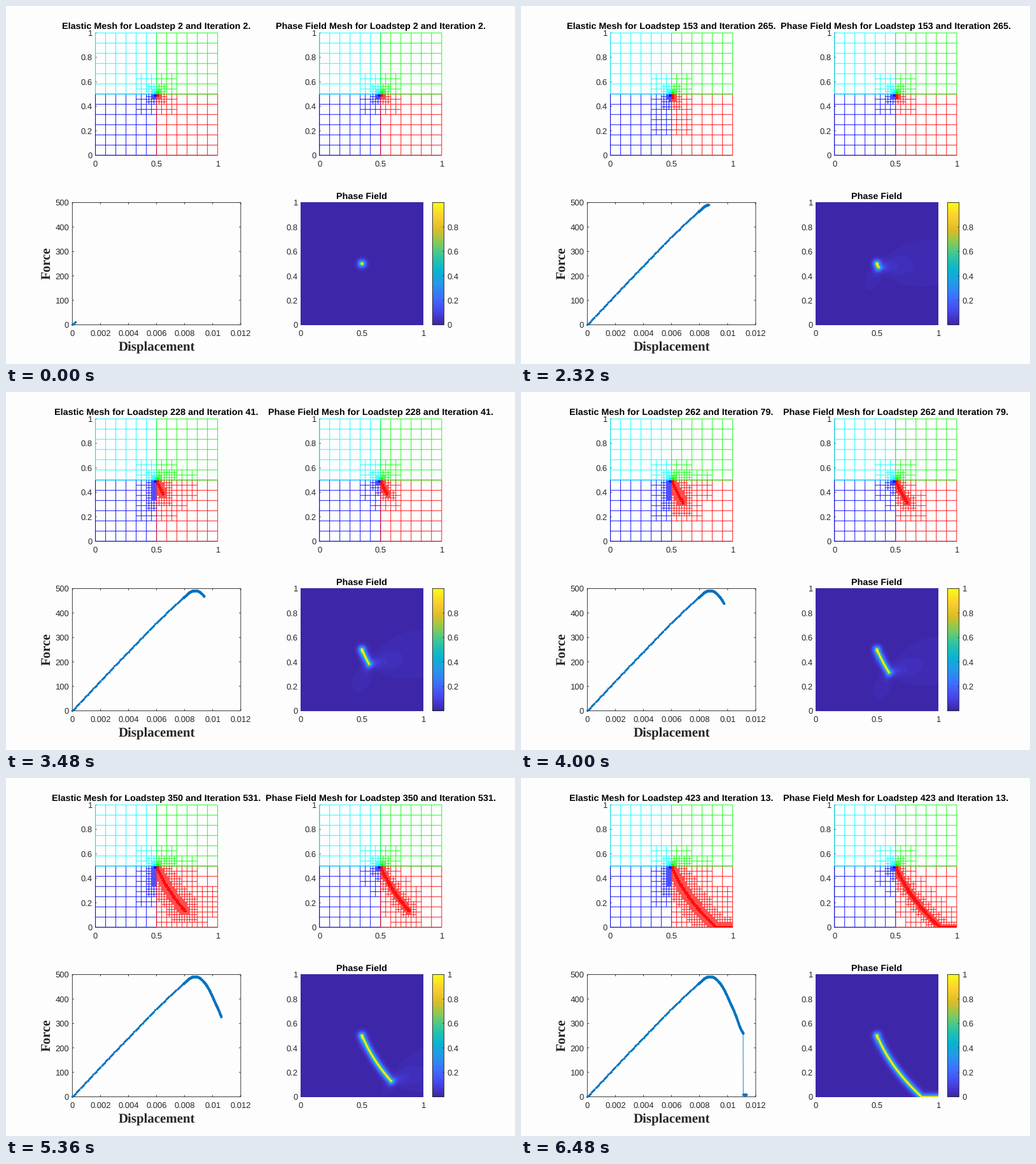
Animation of 800x562 px, one loop 6520 ms. Source, as a matplotlib script:

```python
import numpy as np
import matplotlib.pyplot as plt
from matplotlib.animation import FuncAnimation
from matplotlib.collections import LineCollection
from matplotlib.colors import LinearSegmentedColormap

plt.rcParams["text.hinting"] = "none"

W, H, DPI = 800, 562, 100
FRAMES, INTERVAL = 163, 40
PT = 72 / DPI                       # points per pixel
PAPER, INK, LINE = "#fdfdfe", "#262626", "#0072bd"
TICK, TITLE, LABEL = 13.04 * PT, 14.35 * PT, 20.86 * PT
LAST, BREAK = 423, 400              # final load step, step of full rupture

PARULA = LinearSegmentedColormap.from_list("parula", [
    (.2422, .1504, .6603), (.2803, .2782, .9221), (.2440, .4358, .9988),
    (.1540, .5902, .9218), (.0297, .7082, .8163), (.1938, .7758, .6251),
    (.5044, .7993, .3480), (.8634, .7406, .1596), (.9892, .8136, .1885),
    (.9769, .9839, .0805)], N=64)

fig = plt.figure(figsize=(W / DPI, H / DPI), dpi=DPI, facecolor=PAPER)
ax = fig.add_axes([0, 0, 1, 1])
ax.axis("off")


# ---- crack path: curve down to the lower edge, then along it ----
cy = np.linspace(.5, 0, 250)
fit = np.polyfit([.5, .385, .24, .13, 0], [.5, .555, .648, .737, .865], 3)
px = np.r_[np.polyval(fit, cy), np.linspace(.865, 1, 50)]
py = np.r_[cy, np.zeros(50)]
px[0] = .5
reach = np.interp(-py, [-.5, -.47, -.385, -.24, -.13, -.035],
                  [93, 153, 228, 298, 350, BREAK - 1])
reach[0] = 0
reach[py < .035] = BREAK


# ---- helpers ----
def text(x, y, s, size=TICK, ha="center", **kw):
    kw = {"family": "Liberation Sans", "color": INK, **kw}
    return ax.text(x, y, s, fontsize=size, ha=ha, va="baseline", **kw)


def bold(x, y, s=""):
    return text(x, y, s, TITLE, weight="bold", color="black")


def stroke(x, y, z=1):
    ax.plot(x, y, color=INK, lw=.9 * PT, zorder=z, solid_capstyle="butt", snap=False)


def x_labels(left, width, base, labels):
    for i, s in enumerate(labels):
        text(left + width * i / (len(labels) - 1), base, s)


def y_labels(right, bottom, height, labels):
    for i, s in enumerate(labels):
        text(right, bottom - height * i / (len(labels) - 1) + 4.7, s, ha="right")


UNIT = ["0", "0.2", "0.4", "0.6", "0.8", "1"]
HALF = ["0", "0.5", "1"]


# ---- quadtree meshes ----
BASE = 1 / 12
QUADS = [((0, 0), "#0000ff"), ((.5, 0), "#ff0000"),
         ((0, .5), "#00ffff"), ((.5, .5), "#00ff00")]


def quad_color(x, y):
    return next(c for (qx, qy), c in QUADS if qx <= x < qx + .5 and qy <= y < qy + .5)


def base_grid():
    segs, cols = [], []
    for (qx, qy), c in QUADS:
        for k in range(7):
            t = k * BASE
            segs += [[(qx + t, qy), (qx + t, qy + .5)], [(qx, qy + t), (qx + .5, qy + t)]]
            cols += [c, c]
    return segs, cols


def refine(reaches, zones=()):
    """Crosses of every split cell, as (birth, segments, colour)."""
    out = []

    def split(x, y, h, level, parent):
        radius = np.full(px.size, reaches[level] * h)
        radius[0] = 1.05 * h        # notch tip
        near = np.maximum(abs(px - x), abs(py - y)) - h / 2 < radius
        t = reach[near.argmax()] if near.any() else np.inf
        for deep, x0, y0, x1, y1, start in zones:
            if level <= deep and x0 < x < x1 and y0 < y < y1:
                t = min(t, start)
        t = max(t, parent)
        if t == np.inf:
            return
        r = h / 2
        out.append((t, [[(x - r, y), (x + r, y)], [(x, y - r), (x, y + r)]], quad_color(x, y)))
        if level + 1 < len(reaches):
            for dx in (-r / 2, r / 2):
                for dy in (-r / 2, r / 2):
                    split(x + dx, y + dy, r, level + 1, t)

    for i in range(12):
        for j in range(12):
            split((i + .5) * BASE, (j + .5) * BASE, BASE, 0, 0)
    return sorted(out, key=lambda c: c[0])


class Mesh:
    SIZE, BOTTOM = 192.1, 234.3

    def __init__(self, left, name, reaches, zones=()):
        self.name = name
        top = self.BOTTOM - self.SIZE
        stroke([left, left, left + self.SIZE], [top, self.BOTTOM, self.BOTTOM])
        for k in range(6):
            y = self.BOTTOM - self.SIZE * k / 5
            stroke([left, left + 2], [y, y])
        x_labels(left, self.SIZE, 252, HALF)
        y_labels(left - 5, self.BOTTOM, self.SIZE, UNIT)
        self.title = bold(left + self.SIZE / 2, 36.3)

        segs, cols = base_grid()
        self.fixed = len(segs)
        cells = refine(reaches, zones)
        self.births = np.array([c[0] for c in cells])
        for _, cross, c in cells:
            segs += cross
            cols += [c, c]
        self.segs = np.array(segs) * [self.SIZE, -self.SIZE] + [left, self.BOTTOM]
        self.lines = LineCollection([], colors=cols, linewidths=.88 * PT, zorder=2, snap=False)
        ax.add_collection(self.lines)

    def update(self, step, iteration):
        n = np.searchsorted(self.births, step, "right")
        self.lines.set_segments(self.segs[:self.fixed + 2 * n])
        self.title.set_text(f"{self.name} for Loadstep {step} and Iteration {iteration}.")


# deepest level, box, first load step
ZONES = [(0, 1 / 3, 1 / 6, 2 / 3, 1 / 3, 148), (0, 2 / 3, 1 / 3, 5 / 6, 7 / 12, 215),
         (0, 5 / 6, 1 / 12, 1, 1 / 3, 330), (2, 11 / 24, 1 / 3, .5, .5, 200),
         (1, 5 / 12, 1 / 4, .5, .5, 215), (1, .5, .5, 2 / 3, 7 / 12, 215)]
meshes = [Mesh(140.6, "Elastic Mesh", (1.4, 1.6, 1.1, .4), ZONES),
          Mesh(492.7, "Phase Field Mesh", (.9, .7, .6, .5))]


# ---- force against displacement ----
FL, FR, FT, FB = 104.3, 368.9, 308.6, 500.4


def hermite(x, xs, ys):
    m = np.gradient(ys, xs)
    i = np.clip(np.searchsorted(xs, x, "right") - 1, 0, len(xs) - 2)
    h = xs[i + 1] - xs[i]
    t = (x - xs[i]) / h
    return ((1 + 2 * t) * (1 - t) ** 2 * ys[i] + t * (1 - t) ** 2 * h * m[i]
            + t * t * (3 - 2 * t) * ys[i + 1] + t * t * (t - 1) * h * m[i + 1])


steps = np.arange(LAST + 1)
disp = .1 * np.minimum(steps, 79) + .01 * np.maximum(steps - 79, 0)     # in 1e-3
force = hermite(
    disp,
    np.array([0, 2, 4, 6, 7, 8, 8.35, 8.7, 9.05, 9.4, 9.75, 10.1, 10.62, 10.9, 11.11]),
    np.array([0, 122, 242, 360, 415, 467, 485, 492, 487, 468, 437, 394, 325, 280, 259.]))
force[BREAK:] = 8
curve_x = FL + disp / 12 * (FR - FL)
curve_y = FB - force / 500 * (FB - FT)

stroke([FL, FR, FR, FL, FL], [FB, FB, FT, FT, FB])
for k in range(7):
    x = FL + (FR - FL) * k / 6
    stroke([x, x], [FB, FB - 2.7])
    stroke([x, x], [FT, FT + 2.7])
for k in range(6):
    y = FB - (FB - FT) * k / 5
    stroke([FL, FL + 2.7], [y, y])
    stroke([FR, FR - 2.7], [y, y])
x_labels(FL, FR - FL, 518, ["0"] + [f"{.002 * k:.3g}" for k in range(1, 7)])
y_labels(99, FB, FB - FT, [str(100 * k) for k in range(6)])
serif = dict(family="Liberation Serif", weight="bold")
text(237, 542, "Displacement", LABEL, **serif)
text(69.5, 404, "Force", LABEL, rotation=90, rotation_mode="anchor", **serif)
curve, = ax.plot([], [], color=LINE, lw=.9 * PT, marker="o", ms=3.5 * PT, mew=0,
                 zorder=3, snap=False)


# ---- phase field ----
PL, PR, PTOP, PBOT = 463.2, 655.6, 308.5, 500.8
N = 192
g = (np.arange(N) + .5) / N
gx, gy = np.meshgrid(g, g[::-1])
near = np.full((N, N), np.inf)
nearest = np.zeros((N, N), int)
for k, (x, y) in enumerate(zip(px, py)):
    d = np.hypot(gx - x, gy - y)
    closer = d < near
    near[closer] = d[closer]
    nearest[closer] = k


def lobe(r, theta, gain, heading, width, decay):
    turn = (theta - heading + np.pi) % (2 * np.pi) - np.pi
    return gain * np.exp(-(turn / width) ** 2) / (1 + r / decay)


def phase(step):
    tip = np.searchsorted(reach, step, "right") - 1
    dx, dy = gx - px[tip], gy - py[tip]
    r = np.hypot(dx, dy)
    dist = np.where(nearest <= tip, near, r)
    core = np.exp(-np.maximum(dist - .003, 0) / .0145)
    if step >= BREAK:
        return core
    theta = np.arctan2(dy, dx)
    ahead = .12 * min(1, (step / 98) ** 2)
    below = np.interp(step, [0, 93, 153, 228, 298, 390], [0, .047, .068, .08, .07, .03])
    heading = np.interp(step, [93, 298], [0, .3])
    haze = lobe(r, theta, ahead, heading, .75, .1) + lobe(r, theta, below, -2, .75, .06)
    return core + (1 - core) * haze


def picture(data, left, right, z=2):
    return ax.imshow(data, cmap=PARULA, vmin=0, vmax=1, aspect="auto", zorder=z,
                     interpolation="nearest", extent=(left, right, PBOT, PTOP))


field = picture(phase(2), PL, PR)
bold((PL + PR) / 2, 303, "Phase Field")
x_labels(PL, PR - PL, 518, HALF)
y_labels(458.5, FB, FB - FT, UNIT)

BL, BR = 670.4, 688.4
picture(np.linspace(1, 0, 64)[:, None], BL, BR)
stroke([BL, BR, BR, BL, BL], [FB, FB, FT, FT, FB], 3)
bar = []
for k, s in enumerate(UNIT):
    y = FB - (FB - FT) * k / 5
    stroke([BR - 2, BR], [y, y], 3)
    bar.append(text(693.5, y + 4.7, s, ha="left"))

ax.set_xlim(0, W)
ax.set_ylim(H, 0)


# ---- motion ----
ITER_AT = [2, 46, 93, 118, 153, 228, 298, 350, 399, 404, 423]
ITER = np.log([2, 4, 10, 30, 265, 41, 159, 531, 900, 150, 13])


def draw(i):
    step = round(2 + (LAST - 2) * i / (FRAMES - 1))
    iteration = round(float(np.exp(np.interp(step, ITER_AT, ITER))))
    for mesh in meshes:
        mesh.update(step, iteration)
    curve.set_data(curve_x[:step + 1], curve_y[:step + 1])
    field.set_data(phase(step))
    bar[0].set_visible(step < 4 or step >= BREAK)
    bar[-1].set_visible(step >= 260)


anim = FuncAnimation(fig, draw, frames=FRAMES, interval=INTERVAL, repeat=True, repeat_delay=0)
plt.show()
```
